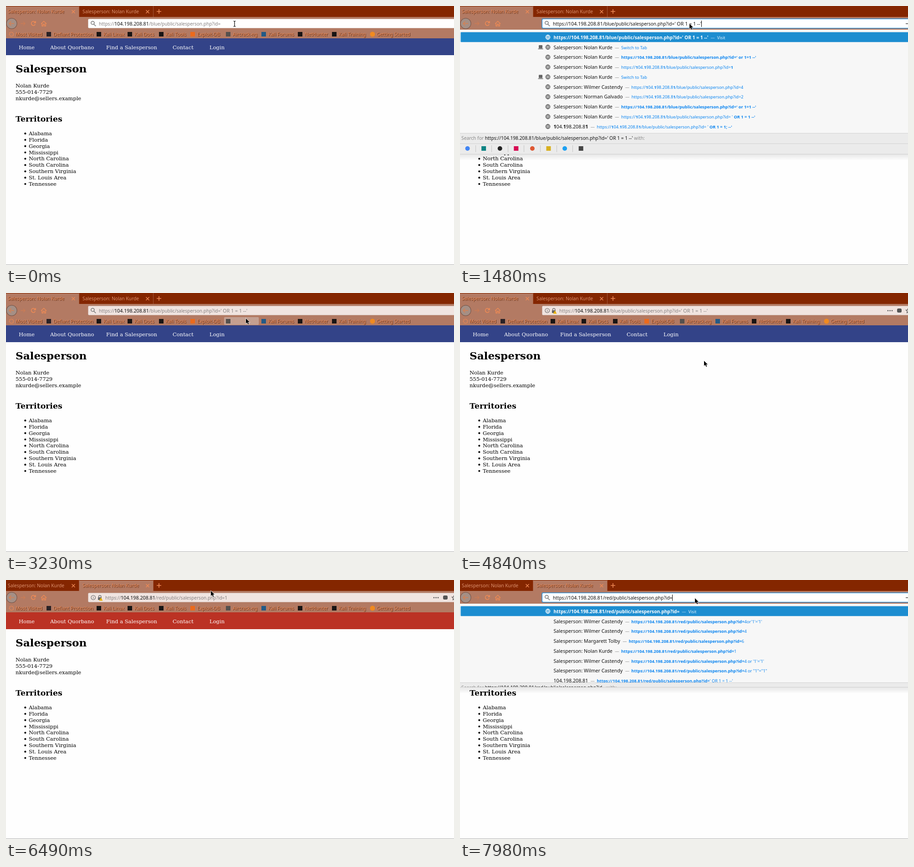
Animation of 984x569 px, one loop 8 s. Source, as an HTML page with a canvas:

```html
<!DOCTYPE html>
<html lang="en">
<head>
<meta charset="utf-8">
<title>Salesperson</title>
<style>
html, body { margin: 0; width: 100%; height: 100%; overflow: hidden; background: #fefefe; }
canvas { display: block; }
</style>
</head>
<body>
<canvas id="stage" width="984" height="569"></canvas>
<script>
const ctx = document.getElementById('stage').getContext('2d');
const LOOP = 8000;
const UI = '"Noto Sans", "Open Sans", sans-serif';
const SERIF = '"DejaVu Serif", serif';
const BODY = 11.54, LINE = 13.85;
const ORANGE = '#ee8a55', TOOLBAR = '#b37a63', TABBAR = '#842600', LINK = '#0a84f0';
const PERSON = 'Nolan Kurde', TITLE = 'Salesperson: ' + PERSON;
const HOST = '104.198.208.81', PAGE = '/public/salesperson.php?id=';
const INJECTION = "' OR 1 = 1 --'";

// Pointer stops: time, x, y, shape
const POINTER = [
  [0, 502, 39, 'beam'], [1240, 504, 39], [3230, 527, 56], [4060, 528, 60], [4180, 527, 67],
  [4330, 537, 100], [4450, 543, 130], [4570, 545, 149], [4840, 536, 149], [4960, 288, 58],
  [5120, 246, 56], [5270, 232, 34], [5390, 220, 12], [6370, 300, 16], [6490, 450, 24],
  [6610, 592, 30], [6760, 596, 37, 'beam'], [6910, 550, 39, 'beam'], [7030, 517, 40, 'beam'],
  [7860, 516, 40]
];

const BOOKMARKS = [
  ['Most Visited', 21], ['Defiant Protection', 104, '#2a2226'], ['Kali Linux', 214, '#191514'],
  ['Kali Docs', 282, '#191514'], ['Kali Tools', 351, '#191514'], ['Exploit-DB', 420, '#ec6a1c'],
  ['Aircrack-ng', 498, '#55504e'], ['Kali Forums', 576, '#245a86'], ['NetHunter', 656, '#191514'],
  ['Kali Training', 731, '#191514'], ['Getting Started', 814, '#f08a20', true]
];
const STATES = ['Alabama', 'Florida', 'Georgia', 'Mississippi', 'North Carolina',
  'South Carolina', 'Southern Virginia', 'St. Louis Area', 'Tennessee'];
const ENGINES = ['#4285f4', '#0c8484', '#222', '#d70a53', '#de5833', '#d8b020', '#1da1f2', '#444'];

// Asterisks switch bold on and off
const blue = 'https://' + HOST + '/blue' + PAGE;
const red = '*https://' + HOST + '/red' + PAGE + '*';
const marked = 'https://*1*04.*1*98.208.8*1*/blue' + PAGE;
const who = name => 'Salesperson: ' + name;
const SUGGESTIONS = {
  blue: [
    [TITLE, 'Switch to Tab', true], [TITLE, `*${blue}' or 1=1 --'*`], [TITLE, marked + '*1*'],
    [TITLE, 'Switch to Tab', true], [who('Wilmer Castendy'), marked + '4'],
    [who('Norman Galvado'), marked + '2'], [TITLE, `*${blue}' or 1=1 --'*`],
    [TITLE, marked + " ' *OR 1 = 1 --'*"],
    ['*1*04.*1*98.208.8*1*', marked + " ' *OR 1 = 1; --'*"]
  ],
  red: [
    [who('Wilmer Castendy'), red + "4or'1'='1'"], [who('Wilmer Castendy'), red + '4'],
    [who('Margarett Tolby'), red + '6'], [TITLE, red + '1'],
    [who('Wilmer Castendy'), red + "4 or '1'='1'"],
    [who('Wilmer Castendy'), red + '4 or "1"="1"'], [HOST, red + "' OR 1 = 1 --'"]
  ]
};

function box(x, y, w, h, color, radius = 0) {
  ctx.fillStyle = color;
  ctx.beginPath();
  ctx.roundRect(x, y, w, h, radius);
  ctx.fill();
}

function dot(x, y, r, color) {
  ctx.fillStyle = color;
  ctx.beginPath();
  ctx.arc(x, y, r, 0, 7);
  ctx.fill();
}

function stroke(path, color, width = 1) {
  ctx.strokeStyle = color;
  ctx.lineWidth = width;
  ctx.stroke(new Path2D(path));
}

// Returns the x where the text ends
function text(str, x, y, color, size = 10.25, family = UI, weight = '') {
  ctx.font = `${weight} ${size}px ${family}`;
  ctx.fillStyle = color;
  ctx.fillText(str, x, y);
  return x + ctx.measureText(str).width;
}

function rich(str, x, y, color, size) {
  str.split('*').forEach((part, i) => {
    if (part) x = text(part, x, y, color, size, UI, i % 2 ? 'bold' : '');
  });
  return x;
}

function shadowed(str, x, y) {
  text(str, x + 1, y + 1, 'rgba(50,15,0,.7)');
  text(str, x, y, ORANGE);
}

function cross(x, y) {
  stroke(`M${x - 3.5} ${y - 3.5}l7 7m0 -7l-7 7`, ORANGE, 1.4);
}

function drawPage(site) {
  box(0, 0, 984, 569, '#fefefe');
  box(0, 71, 984, 37, site === 'red' ? '#bb3224' : '#334388');
  const links = [['Home', 28], ['About Quorbano', 97], ['Find a Salesperson', 220], ['Contact', 366], ['Login', 447]];
  for (const [label, x] of links) text(label, x, 95, '#fff', BODY, SERIF);
  text('Salesperson', 21, 146, '#000', BODY * 2, SERIF, 'bold');
  [PERSON, '555-014-7729', 'nkurde@sellers.example'].forEach((line, i) =>
    text(line, 21, 179 + i * LINE, '#000', BODY, SERIF));
  text('Territories', 21, 254, '#000', BODY * 1.5, SERIF, 'bold');
  STATES.forEach((state, i) => {
    const y = 284 + i * LINE;
    dot(42.3, y - 3.8, 2.1, '#000');
    text(state, 50, y, '#000', BODY, SERIF);
  });
  box(0, 568, 984, 1, '#aaa');
}

function drawTabs(site, hover) {
  box(0, 0, 984, 24, TABBAR);
  box(0, 24, 984, 47, TOOLBAR);
  const active = site === 'blue' ? 0 : 1;
  if (hover) box(161, 0, 163, 24, '#8f3715');
  [[0, 160, 4, 148], [161, 163, 168, 311]].forEach(([x, w, textX, closeX], i) => {
    if (i === active) {
      box(x, 1, w, 23, TOOLBAR);
      shadowed(TITLE, textX, 16);
    } else {
      text(TITLE, textX, 16, '#dd916f');
    }
    cross(closeX, 12.5);
  });
  box(160, 0, 1, 24, '#a2593c');
  box(323, 0, 1, 24, '#a2593c');
  stroke('M331 12h10m-5 -5v10', ORANGE, 1.6);
}

function drawButtons() {
  dot(12.5, 38.5, 12, '#6e5146');
  dot(12.5, 38.5, 11, '#a58f85');
  stroke('M18 38.5h-11m4.5 -4.5l-4.5 4.5l4.5 4.5', '#d98050', 1.5);
  stroke('M32 38.5h10m-4 -4l4 4l-4 4', '#cb7c55', 1.3);
  stroke('M64 36a4.5 4.5 0 1 0 .3 4M65 33v4h-4', ORANGE, 1.6);
  stroke('M77 39l6 -5.5l6 5.5M79 38v6h2.6v-4h2.8v4h2.6v-6', ORANGE, 1.4);
}

function drawBookmarks(hovered) {
  for (const [label, x, color, round] of BOOKMARKS) {
    const hot = label === hovered;
    if (hot) {
      ctx.font = `10.25px ${UI}`;
      box(x - 19, 53, ctx.measureText(label).width + 22, 17, '#c3a092', 2);
    }
    if (!color) {
      ctx.setLineDash([1.8, 1.6]);
      stroke('M7.5 62a4.5 4.5 0 1 0 9 0a4.5 4.5 0 1 0 -9 0', ORANGE, 2);
      ctx.setLineDash([]);
    } else if (round) dot(x - 9, 62, 5.5, color);
    else box(x - 15, 57, 10, 10, color);
    if (hot) text(label, x, 66, '#c99c87');
    else shadowed(label, x, 66);
  }
}

function drawAddress(s) {
  const { site, query, focused, loaded } = s;
  const bright = focused || s.barHover;
  if (focused) box(179, 27, 820, 23, 'rgba(60,150,215,.5)', 3);
  box(180, 28, 820, 21, focused ? '#2a92dc' : '#ad8573', 2);
  box(focused ? 181 : 180.5, focused ? 29 : 28.5, 820, focused ? 19 : 20, bright ? '#fff' : '#f0e4e0', 2);
  const x = loaded ? 218 : 204, ink = focused ? '#111' : '#858080';
  if (loaded) {
    stroke('M187 38.5a4.7 4.7 0 1 0 9.4 0a4.7 4.7 0 1 0 -9.4 0M191.7 37.7v3.3M191.7 35.4v1.2', '#666', 1.1);
    stroke('M203.5 38v-1.5a2.7 2.7 0 0 1 5.4 0v1.5', '#666', 1.3);
    box(202, 38, 8, 6, '#666', 1);
    ctx.fillStyle = '#e8b000';
    ctx.fill(new Path2D('M208.5 38.5l4 7h-8z'));
    for (const dx of [0, 4.5, 9]) dot(940 + dx, 38.8, 1.4, '#555');
    box(960, 34, 10, 9, '#555', 3);
    stroke('M984 34l-1 3l-3.5 .5l2.8 2.5l-.7 3.5l2.4 -1.3', '#555', 1.2);
    if (bright) stroke('M920 37l4 4l4 -4', '#555', 1.5);
  } else {
    stroke('M186.8 37a3.6 3.6 0 1 0 7.2 0a3.6 3.6 0 1 0 -7.2 0M193 40l4.3 4.3', '#777', 1.5);
    if (focused && s.popup) stroke('M979 38.8h6', '#444', 1.4);
  }
  text('https://', x, 43, ink, 10);
  text(HOST, x + 34, 43, '#111', 10.7);
  const pathEnd = text(`/${site}${PAGE}`, x + 110, 43, ink, 10.05);
  const end = text(query, pathEnd, 43, ink, 10.7);
  if (focused && s.caret) box(Math.round(end), 32, 1, 14, '#000');
}

function globe(x, y, color) {
  stroke(`M${x - 5} ${y}a5 5 0 1 0 10 0a5 5 0 1 0 -10 0h10M${x - 4} ${y - 2.8}h8m-8 5.6h8` +
    `M${x} ${y - 5}q-5 5 0 10q5 -5 0 -10`, color, 1);
}

function drawPopup({ site, query, popup }) {
  const { bottom, alpha = 1 } = popup;
  const open = bottom === 326;
  const listEnd = open ? 279 : bottom - 11;
  const address = `https://${HOST}/${site}${PAGE}${query}`;
  ctx.save();
  ctx.globalAlpha = alpha;
  const shade = ctx.createLinearGradient(0, bottom, 0, bottom + 12);
  shade.addColorStop(0, 'rgba(0,0,0,.09)');
  shade.addColorStop(1, 'rgba(0,0,0,.01)');
  box(0, bottom, 984, 12, shade);
  ctx.beginPath();
  ctx.rect(0, 52, 984, bottom - 52);
  ctx.clip();
  box(0, 52, 984, 300, '#f7f7f7');
  box(1.5, 57.5, 983, 21.7, '#1d8dd0', 1);
  globe(193, 68.5, '#fff');
  let x = text(address, 205.5, 73, '#fff', 10.25, UI, 'bold');
  x = text('—', x + 5, 73, '#b5dcf3', 9.2);
  text('Visit', x + 5, 73, '#e4f3fc', 9.2);
  SUGGESTIONS[site].forEach(([title, link, tab], i) => {
    const y = 90.5 + i * 21.78;
    if (open) {
      globe(193, y, '#555');
      if (tab) {
        box(173, y - 4.5, 8, 7, '#666', 1);
        box(171.5, y + 3, 11, 1.5, '#666');
      }
    }
    let end = rich(title, 205.5, y + 4, '#111', 10.7);
    end = text('—', end + 5.5, y + 4, '#888', 9.2);
    rich(link, end + 4.5, y + 4, LINK, 9.2);
  });
  box(0, listEnd, 984, 100, '#ebebeb');
  box(0, listEnd, 984, 1, '#d2d2d2');
  x = text('Search for ', 3, listEnd + 15, '#888');
  x = text(address, x, listEnd + 15, '#111');
  text(' with:', x, listEnd + 15, '#888');
  box(0, listEnd + 23, 984, 1, '#d2d2d2');
  ENGINES.forEach((color, i) => {
    const cx = 16.5 + i * 35.6;
    if (i % 2) box(cx - 5, listEnd + 29, 10, 10, color);
    else dot(cx, listEnd + 34, 5, color);
    if (i < 7) box(Math.round(cx + 17), listEnd + 27, 1, 15, '#c4c4c4');
  });
  box(0, bottom - 1, 984, 1, '#cfcfcf');
  ctx.restore();
}

function drawPointer(t) {
  const [, x, y, shape] = POINTER.findLast(stop => stop[0] <= t);
  if (shape) {
    const beam = `M${x - 2.5} ${y - 6}q2.5 0 2.5 1.5v9q0 1.5 -2.5 1.5m5 -12q-2.5 0 -2.5 1.5m0 9q0 1.5 2.5 1.5`;
    stroke(beam, '#fff', 2.4);
    stroke(beam, '#000', 1.2);
    return;
  }
  const arrow = new Path2D(`M${x} ${y}v11l2.6 -2.3l2 4.3l1.8 -.8l-2 -4.2h3.6z`);
  ctx.strokeStyle = 'rgba(255,255,255,.8)';
  ctx.lineWidth = 1.4;
  ctx.stroke(arrow);
  ctx.fillStyle = '#000';
  ctx.fill(arrow);
}

function popupAt(t) {
  if (t >= 7980) return { bottom: 236 };
  if (t >= 7860) return { bottom: 130 };
  if (t < 1240 || t >= 1870) return null;
  if (t < 1360) return { bottom: 130 };
  if (t < 1480) return { bottom: 236 };
  return { bottom: 326, alpha: t < 1630 ? 1 : t < 1750 ? .65 : .3 };
}

function stateAt(t) {
  const within = (from, to) => t >= from && t < to;
  const site = t < 6370 ? 'blue' : 'red';
  return {
    site,
    query: site === 'blue' ? (t < 1240 ? '' : INJECTION) : (t < 7860 ? '1' : ''),
    focused: within(120, 3230) || t >= 6910,
    caret: !within(2430, 3230),
    loaded: within(3750, 7860),
    barHover: t < 120 || within(5270, 5390) || within(6610, 6910),
    tabHover: within(5390, 6370),
    tooltip: within(6120, 6370),
    bookmark: within(3230, 4330) ? 'Aircrack-ng' : within(4960, 5120) ? 'Kali Docs' : within(5120, 5270) ? 'Kali Linux' : '',
    popup: popupAt(t)
  };
}

function draw(t) {
  const s = stateAt(t);
  drawPage(s.site);
  drawTabs(s.site, s.tabHover);
  drawButtons();
  drawBookmarks(s.bookmark);
  drawAddress(s);
  if (s.popup) drawPopup(s);
  if (s.tooltip) {
    box(221, 28, 143, 34, 'rgba(22,20,20,.9)');
    text(TITLE, 230, 48.5, '#fff');
  }
  drawPointer(t);
}

function tick() {
  draw(performance.now() % LOOP);
  requestAnimationFrame(tick);
}
tick();
</script>
</body>
</html>
```
